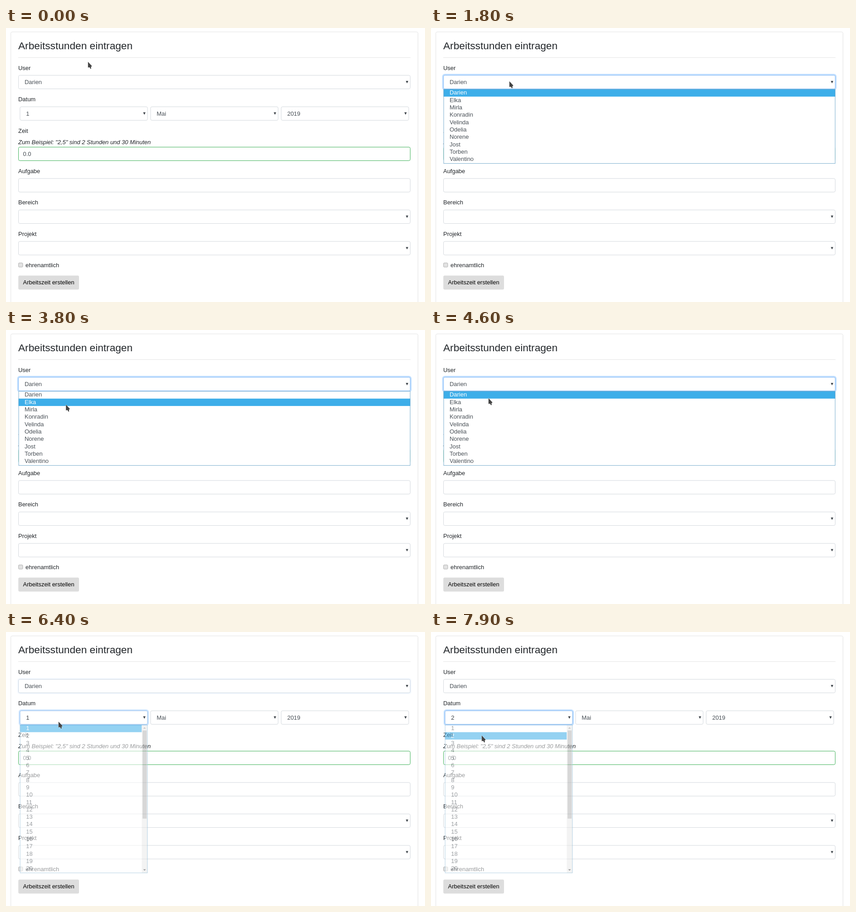
Recreate the animation shown at these times as an HTML page. Size 924 by 606 pixels, loop 8 s.

```html
<!DOCTYPE html>
<html lang="de">
<head>
<meta charset="utf-8">
<title>Arbeitsstunden eintragen</title>
<style>
  html, body { margin: 0; width: 100%; height: 100%; overflow: hidden; background: #fff; }
  svg { display: block; width: 100vw; height: 100vh; }
  text { font: 12.96px "Liberation Sans", Arial, sans-serif; fill: #212529; white-space: pre; }
  .title { font-size: 22.68px; }
  .hint { font-style: italic; }
  .value, .item { fill: #495057; }
  .on { fill: #fff; }
  .dark { fill: #3a4046; }
</style>
</head>
<body>
<svg id="stage" viewBox="0 0 924 606"></svg>
<script>
const LOOP = 8000, STEP = 100, ROW = 16.33;
const NS = 'http://www.w3.org/2000/svg';
const stage = document.getElementById('stage');
const names = ['Darien', 'Elka', 'Mirla', 'Konradin', 'Velinda', 'Odelia', 'Norene', 'Jost', 'Torben', 'Valentino'];
const days = Array.from({ length: 20 }, (_, i) => String(i + 1));

function add(parent, tag, attrs, content) {
  const el = document.createElementNS(NS, tag);
  for (const key in attrs) el.setAttribute(key, attrs[key]);
  if (content) el.textContent = content;
  parent.appendChild(el);
  return el;
}

const label = (x, y, str, cls = '', parent = stage) => add(parent, 'text', { x, y, class: cls }, str);
const box = (parent, x, y, width, height, attrs) => add(parent, 'rect', { x, y, width, height, ...attrs });

function field(x, y, w, stroke = '#ced4da') {
  box(stage, x + .4, y + .4, w - .8, 30, { rx: 3, fill: '#fff', stroke, 'stroke-width': .9 });
}

function select(x, y, w, value = '') {
  field(x, y, w);
  const ax = x + w - 7.4;
  add(stage, 'path', { d: `M${ax - 2.7} ${y + 12.8}h5.4l-2.7 5.4z`, fill: '#3b4147' });
  return label(x + 13.7, y + 19.9, value, 'value');
}

function focusRing(x, y, w) {
  const g = add(stage, 'g', { fill: 'none' });
  box(g, x - 1.3, y - 1.3, w + 2.6, 33.4, { rx: 4.5, stroke: '#007bff', 'stroke-opacity': .25, 'stroke-width': 2.6 });
  box(g, x + .4, y + .4, w - .8, 30, { rx: 3, stroke: '#80bdff', 'stroke-width': .9 });
  return g;
}

function popup(x, y, w, h, textX, items, barWidth = 0) {
  const g = add(stage, 'g', {});
  box(g, x, y, w, h, { fill: '#fff' });
  const mark = box(g, x, 0, w - barWidth, ROW, { fill: '#3daee9' });
  const texts = items.map((str, i) => label(textX, y + 12 + i * ROW, str, 'item', g));
  if (barWidth) {
    const bx = x + w - barWidth, mid = bx + 6;
    box(g, bx, y, barWidth, h, { fill: '#eaeaea' });
    box(g, bx + 1.7, y + 12.5, 9, 195, { fill: '#b8b8b8' });
    add(g, 'path', { d: `M${mid - 3} ${y + 8.5}h6l-3 -3.2z`, fill: '#9a9a9a' });
    add(g, 'path', { d: `M${mid - 3} ${y + h - 8.5}h6l-3 3.2z`, fill: '#505050' });
  }
  box(g, x + .4, y + .2, w - .8, h - .6, { fill: 'none', stroke: '#6ba5c8', 'stroke-width': .9 });

  return (opacity, pointerY) => {
    g.setAttribute('opacity', opacity);
    const row = Math.max(0, Math.min(items.length - 1, Math.floor((pointerY - y) / ROW)));
    mark.setAttribute('y', y + row * ROW);
    texts.forEach((el, i) => el.classList.toggle('on', i === row));
  };
}

// Form
box(stage, 10.7, 8.7, 897.8, 640, { rx: 3, fill: '#fff', stroke: '#dfdfdf', 'stroke-width': .9 });
label(27, 46.6, 'Arbeitsstunden eintragen', 'title');
box(stage, 27, 65, 865, .9, { fill: '#e3e3e3' });
label(27, 92.5, 'User');
select(27.2, 104.2, 864.6, names[0]);
label(27, 162, 'Datum');
const day = select(30.5, 173.8, 282, '1');
select(318.5, 173.8, 282, 'Mai');
select(606.5, 173.8, 282, '2019');
label(27, 231.6, 'Zeit');
label(27, 257.4, 'Zum Beispiel: "2,5" sind 2 Stunden und 30 Minuten', 'hint');
field(27.2, 263, 864.6, '#28a745');
label(37.5, 282.8, '0.0', 'value');
label(27, 320.6, 'Aufgabe');
field(27.2, 332.5, 864.6);
label(27, 390.1, 'Bereich');
select(27.2, 402, 864.6);
label(27, 459.6, 'Projekt');
select(27.2, 471.6, 864.6);
box(stage, 27.7, 519.6, 9.2, 9.2, { rx: 1.5, fill: '#e2e2e2', stroke: '#a9a9a9', 'stroke-width': .9 });
label(43, 529.1, 'ehrenamtlich');
box(stage, 27.2, 547.6, 133.8, 30.8, { rx: 3, fill: '#ddd' });
label(37.6, 567.4, 'Arbeitszeit erstellen').style.fill = '#000';

// Moving parts
const userRing = focusRing(27.2, 104.2, 864.6);
const dayRing = focusRing(30.5, 173.8, 282);
const userList = popup(27.6, 135.4, 864, 164.6, 41, names);
const dayList = popup(30.7, 205.2, 281.5, 328, 44.2, days, 12.7);
const pointer = add(stage, 'path', {
  d: 'M.8 .8V13.4L4.2 12.8L6.2 16.4L8 15.3L7.2 12.2L9.6 10.2Z',
  fill: '#444', stroke: '#fff', 'stroke-width': 1, 'stroke-opacity': .8, 'paint-order': 'stroke'
});

// Pointer keys: time, x, y
const path = [
  [0, 180, 74], [100, 180, 76], [400, 180, 76], [1300, 172, 117], [2400, 172, 117],
  [2700, 155, 151], [3000, 155, 151], [3100, 137, 181.5], [3300, 137, 181.5],
  [4100, 128, 154], [4200, 128, 154], [4400, 127, 150], [4500, 127, 150],
  [4600, 126, 150], [4900, 126, 150], [5500, 126, 161], [5800, 116, 195],
  [5900, 116, 195], [6000, 115, 197.5], [6900, 115, 197.5], [7300, 111, 228], [LOOP, 111, 228]
];

function pointerAt(t) {
  const i = path.findIndex(key => key[0] > t);
  const [t0, x0, y0] = path[i - 1], [t1, x1, y1] = path[i];
  const k = (t - t0) / (t1 - t0);
  return [x0 + (x1 - x0) * k, y0 + (y1 - y0) * k];
}

// One translucent step on opening and one on closing
function fade(t, open, close) {
  if (t < open || t > close) return 0;
  return t === open || t === close ? .55 : 1;
}

function draw(ms) {
  const t = Math.floor((ms % LOOP) / STEP) * STEP;
  const [x, y] = pointerAt(t);
  pointer.setAttribute('transform', `translate(${x} ${y})`);
  userList(fade(t, 1700, 5000), y);
  dayList(fade(t, 6400, 7900), y);
  userRing.setAttribute('opacity', t < 1700 || t > 6400 ? 0 : t === 1700 ? .7 : t === 6400 ? .15 : 1);
  dayRing.setAttribute('opacity', t < 6400 ? 0 : t === 6400 ? .8 : 1);
  day.textContent = t < 7900 ? '1' : '2';
  day.classList.toggle('dark', t >= 6400);
}

const start = performance.now();
function tick() {
  draw(performance.now() - start);
  requestAnimationFrame(tick);
}
tick();
</script>
</body>
</html>
```
